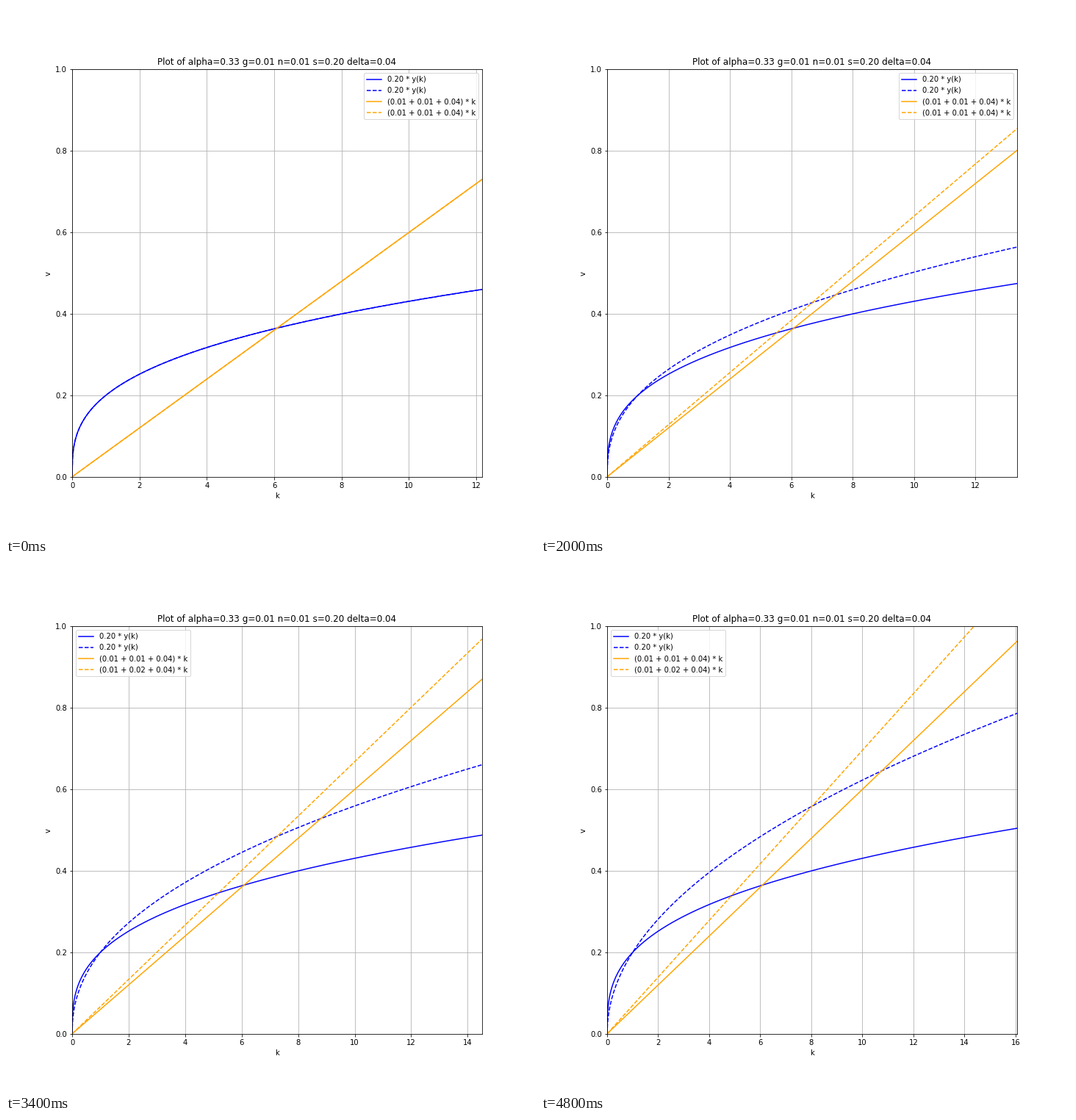
Write a matplotlib script that moves like this. It is 720 px wide and 720 px high and loops after 5 s.

```python
import numpy as np
import matplotlib.pyplot as plt
from matplotlib.animation import FuncAnimation

FRAMES = 25
INTERVAL = 200

SAVING, GROWTH, DELTA = 0.20, 0.01, 0.04
ALPHA_START, ALPHA_END = 1 / 3, 1 / 2
N_START, N_END = 0.01, 0.02

plt.rcParams["font.family"] = "DejaVu Sans"
fig, ax = plt.subplots(figsize=(10, 10), dpi=72)


def steady_state(alpha, n):
    return (SAVING / (n + GROWTH + DELTA)) ** (1 / (1 - alpha))


def plot_saving(k, alpha, style):
    ax.plot(k, SAVING * k**alpha, style, color="blue",
            label=f"{SAVING:.2f} * y(k)")


def plot_break_even(k, n, style):
    ax.plot(k, (GROWTH + n + DELTA) * k, style, color="orange",
            label=f"({GROWTH:.2f} + {n:.2f} + {DELTA:.2f}) * k")


def draw(frame):
    t = frame / FRAMES
    alpha = ALPHA_START + (ALPHA_END - ALPHA_START) * t
    n = N_START + (N_END - N_START) * t
    k_max = 2 * steady_state(alpha, n)
    k = np.linspace(0, k_max, 1000)

    ax.clear()
    plot_saving(k, ALPHA_START, "-")
    plot_saving(k, alpha, "--")
    plot_break_even(k, N_START, "-")
    plot_break_even(k, n, "--")

    ax.set(xlim=(0, k_max), ylim=(0, 1), xlabel="k", ylabel="v")
    ax.set_title(f"Plot of alpha={ALPHA_START:.2f} g={GROWTH:.2f} "
                 f"n={N_START:.2f} s={SAVING:.2f} delta={DELTA:.2f}")
    ax.grid(True)
    ax.legend(loc="best")
    return ax.lines


anim = FuncAnimation(fig, draw, frames=FRAMES, init_func=lambda: draw(0),
                     interval=INTERVAL, repeat=True, repeat_delay=0)
plt.show()
```
